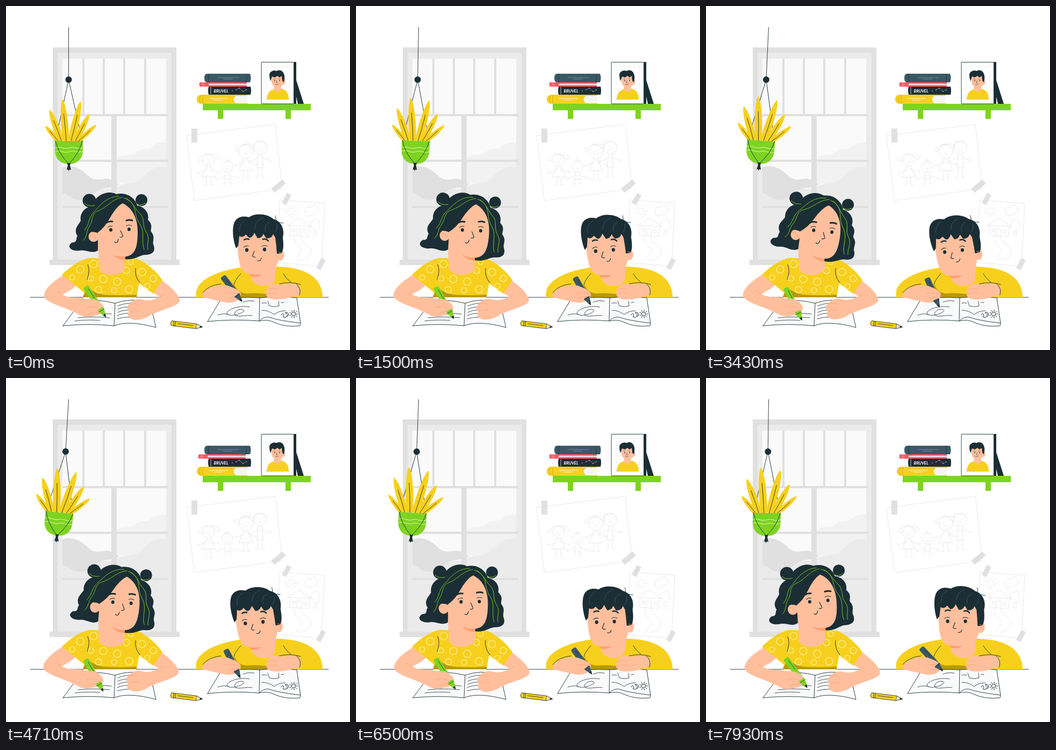
Recreate the animation shown at these times as an HTML page with a canvas. Size 640 px wide and 640 px high, loop 8 s.

```html
<!DOCTYPE html>
<html lang="en">
<head>
<meta charset="utf-8">
<title>Drawing at the table</title>
<style>
html, body { margin: 0; width: 100%; height: 100%; overflow: hidden; background: #fff; }
canvas { display: block; width: 100vw; height: 100vh; }
</style>
</head>
<body>
<canvas id="stage"></canvas>
<script>
const canvas = document.getElementById('stage');
const ratio = window.devicePixelRatio || 1;
canvas.width = canvas.height = 640 * ratio;
const ctx = canvas.getContext('2d');

const LOOP = 8000;
const DARK = '#1b2e35', SLATE = '#3a5964', YELLOW = '#f7d01e', OCHRE = '#b9980f';
const GREEN = '#7ed321', SKIN = '#ffbf9d', SHADE = '#ff9c6e', RED = '#ff5660';
const GREY = '#e0e0e0', MIST = '#ebebeb', PALE = '#fafafa', SKETCH = '#e2e2e2';

// Pose values over the loop, joined by smooth curves
const TIMES = [0, 1500, 2430, 3430, 4710, 6500, 7930, 8000];
const SWING = [0, 1.95, 3.6, 4.9, 6, 3.9, 1.3, 1.2];
const GROWTH = [1, 1.025, 1.04, 1.05, 1.06, 1.08, 1.08, 1.08];
const LEAN = [0, 0.54, 0.78, 1, 0.7, 0.08, -0.38, -0.4];

function sample(values, t) {
  const last = TIMES.length - 1;
  let i = 0;
  while (i < last - 1 && t >= TIMES[i + 1]) i++;
  const slope = k => {
    const a = Math.max(k - 1, 0), b = Math.min(k + 1, last);
    return (values[b] - values[a]) / (TIMES[b] - TIMES[a]);
  };
  const span = TIMES[i + 1] - TIMES[i], u = (t - TIMES[i]) / span;
  const u2 = u * u, u3 = u2 * u;
  return values[i] * (2 * u3 - 3 * u2 + 1) + values[i + 1] * (3 * u2 - 2 * u3) +
    span * (slope(i) * (u3 - 2 * u2 + u) + slope(i + 1) * (u3 - u2));
}

// Rises from 0 to 1 and back, centred on mid
const bump = (t, mid) => Math.abs(t - mid) < 450 ? Math.cos((t - mid) / 900 * Math.PI) : 0;

function fill(color, d) {
  ctx.fillStyle = color;
  ctx.fill(new Path2D(d));
}
function line(color, width, d) {
  ctx.strokeStyle = color;
  ctx.lineWidth = width;
  ctx.stroke(new Path2D(d));
}
function rect(color, x1, y1, x2, y2) {
  ctx.fillStyle = color;
  ctx.fillRect(x1, y1, x2 - x1, y2 - y1);
}
function oval(color, x, y, rx, ry = rx) {
  ctx.fillStyle = color;
  ctx.beginPath();
  ctx.ellipse(x, y, rx, ry, 0, 0, Math.PI * 2);
  ctx.fill();
}
function ring(color, width, x, y, r) {
  ctx.strokeStyle = color;
  ctx.lineWidth = width;
  ctx.beginPath();
  ctx.arc(x, y, r, 0, Math.PI * 2);
  ctx.stroke();
}
function within(draw, x, y, degrees = 0, dx = 0, dy = 0, scale = 1) {
  ctx.save();
  ctx.translate(x + dx, y + dy);
  ctx.rotate(degrees * Math.PI / 180);
  ctx.scale(scale, scale);
  ctx.translate(-x, -y);
  draw();
  ctx.restore();
}
const shift = (draw, dx, dy) => within(draw, 0, 0, 0, dx, dy);

function tape(x, y, w, h, degrees) {
  within(() => rect(GREY, x - w / 2, y - h / 2, x + w / 2, y + h / 2), x, y, degrees);
}
function sun(color, width, x, y, r) {
  ring(color, width, x, y, r);
  for (let i = 0; i < 9; i++) {
    const a = i * Math.PI * 2 / 9, c = Math.cos(a), s = Math.sin(a);
    line(color, width, `M${x + c * r * 1.45},${y + s * r * 1.45}L${x + c * r * 2.1},${y + s * r * 2.1}`);
  }
}

function drawWindow() {
  rect(GREY, 87, 77, 317, 472);
  rect(MIST, 96, 87, 308, 472);
  rect(PALE, 105, 98, 298, 458);
  fill('#f2f2f2', 'M206 284C217 272 229 281 240 273C252 262 259 270 269 263C278 256 286 253 298 254V330H206Z');
  fill(MIST, 'M105 340H200C222 323 238 337 255 318C270 302 284 296 298 301V458H105Z');
  fill(GREY, 'M105 300C121 294 140 302 152 315C162 326 174 323 186 321C198 321 204 331 211 331C198 342 186 334 170 344C154 357 143 363 130 360C119 357 114 349 105 348Z');
  for (const x of [142, 180, 218, 257]) rect(GREY, x, 98, x + 4, 202);
  rect(GREY, 196, 204, 206, 458);
  for (const y of [201, 286, 372]) rect(GREY, 105, y, 302, y + 4);
  rect(GREY, 81, 472, 323, 482);
}

function stickPerson(x, y, r, foot, dress) {
  ring(SKETCH, 0.8, x, y, r);
  oval(SKETCH, x - r / 3, y - 2, 0.8);
  oval(SKETCH, x + r / 3, y - 2, 0.8);
  line(SKETCH, 0.8, `M${x - 4} ${y + 3}Q${x} ${y + 7} ${x + 4} ${y + 3}`);
  const top = y + r, hip = top + (foot - top) * 0.58, w = dress ? 13 : 6;
  line(SKETCH, 0.8, `M${x - 3} ${top}L${x - w} ${hip}H${x + w}L${x + 3} ${top}` +
    `M${x - 4} ${hip}V${foot}h-5M${x + 4} ${hip}V${foot}h5` +
    `M${x - 3} ${top + 6}l-15 7m-3 -3l3 3l-3 2M${x + 3} ${top + 6}l15 5m3 -3l-3 3l4 2`);
}

function drawPapers() {
  const family = 'M336 241L501 220L514 340L351 362Z';
  fill('#fff', family);
  line(SKETCH, 0.8, family);
  stickPerson(377, 287, 11, 333, true);
  line(SKETCH, 0.8, 'M366 286Q360 290 356 286Q364 278 367 277Q380 270 390 284Q396 287 398 281Q390 274 383 276');
  stickPerson(412, 299, 10, 331, false);
  line(SKETCH, 0.8, 'M408 290l3 -5l2 5l4 -3');
  stickPerson(446, 271, 13, 323, true);
  line(SKETCH, 0.8, 'M434 268Q422 274 426 264Q432 265 435 261Q446 252 457 265Q463 269 461 260Q449 253 439 259');
  stickPerson(473, 264, 12, 319, false);
  line(SKETCH, 0.8, 'M462 261Q460 250 469 253Q479 248 485 259');
  tape(350.5, 241, 11, 26, 0);
  tape(507, 335, 27, 10, -40);

  const house = 'M510 361L593 367L587 484L503 477Z';
  fill('#fff', house);
  line(SKETCH, 0.8, house);
  sun(SKETCH, 0.8, 530, 382, 6);
  line(SKETCH, 0.8, 'M524 408L545 394L568 410ZM529 408L527 427L563 429L565 410M540 428V415H549V428M533 415h4v5h-4ZM554 417h5v5h-5Z');
  line(SKETCH, 0.8, 'M557 384C553 376 563 372 566 376C567 368 579 368 579 375C585 380 578 388 572 386C568 393 555 392 557 384M571 413C562 405 567 398 573 399C579 391 586 400 581 405C588 411 580 420 573 417V429M577 417V429');
  line(SKETCH, 0.8, 'M537 430C533 451 560 447 546 462L540 472M548 430C551 445 575 447 566 463Q558 474 545 473');
  tape(522, 359, 21, 9, -62);
  tape(586, 480, 21, 9, -62);
}

function drawShelf(t) {
  rect(GREEN, 366, 182, 567, 194);
  rect(GREEN, 394, 194, 404, 210);
  rect(GREEN, 520, 194, 530, 210);

  fill(SLATE, 'M374 126H454Q457 134 454 142H374Q369 142 369 134Q369 126 374 126Z');
  line(DARK, 0.7, 'M378 126Q375 134 378 142M446 127Q449 134 446 142');
  line('#8fa1a8', 0.7, 'M394 133H433M404 136H421');

  shift(() => {
    fill(RED, 'M361 142H448V150H361Q358 146 361 142Z');
    rect('#ffd9da', 377, 144.5, 448, 147.5);
    line('#ffd9da', 0.6, 'M365 143V149M368 143V149');
  }, -2 * bump(t, 4710), 0);

  fill('#f5f5f5', 'M369 151H382V164H369Q372 157 369 151Z');
  fill(DARK, 'M377 150H455Q457 157 455 165H377Q375 157 377 150Z');
  line('#fff', 0.7, 'M381 151V164');
  ctx.fillStyle = '#fff';
  ctx.font = 'italic bold 7.6px Lato, sans-serif';
  ctx.fillText('BRUVEL', 386.5, 160.8);
  line('#fff', 0.4, 'M428 156L434 153L441 159L447 156');
  for (const [x, y] of [[421, 158], [428, 156], [434, 153], [441, 159], [447, 156]]) oval('#fff', x, y, 0.7);

  shift(() => {
    fill(YELLOW, 'M362 165H449V182H362Q355 181 355 173.5Q355 166 362 165Z');
    fill('#f5f5f5', 'M428 167H449V181H428Q419 174 428 167Z');
    line(OCHRE, 0.6, 'M362 167Q358 174 362 181M367 166Q364 174 367 181');
    line('#fff', 0.8, 'M378 172H412M387 175H402');
  }, -3 * bump(t, 3430), 0);

  fill(DARK, 'M540 138L554 182H543L538 160Z');
  rect(DARK, 535, 104, 540, 182);
  rect('#fff', 475, 104, 535.5, 182);
  line(DARK, 0.9, 'M475.5 104.5H535.5V182H475.5Z');
  line(SKETCH, 0.6, 'M475 104L484 113H528V174H484V113M536 104L528 113M475 182L484 174M536 182L528 174');
  fill(YELLOW, 'M485 174C486 162 490 157 498 155L513 154C522 156 526 163 526 174Z');
  fill(SKIN, 'M499 146H512V155Q506 164 498 155Z');
  fill(SKIN, 'M494 130H517V145Q512 152 502 151Q494 148 494 141Z');
  oval(SKIN, 517, 142, 2.5, 4);
  fill(DARK, 'M492 140Q488 127 492 123Q498 118 503 121Q511 117 516 124Q520 131 517 142L514 139L513 130L509 133L505 130L500 133L495 131Z');
  oval(DARK, 500, 139, 0.9);
  oval(DARK, 509, 139, 0.9);
  line(DARK, 0.6, 'M498 136h3M507 136h3M504 139l-1 4h2M501 146q3 2 6 -1');
}

function leaf(baseX, tipX, tipY, width) {
  const vx = tipX - baseX, vy = tipY - 251, len = Math.hypot(vx, vy);
  const nx = -vy / len * width, ny = vx / len * width;
  const at = (k, side) => `${baseX + vx * k + nx * side} ${251 + vy * k + ny * side}`;
  fill(YELLOW, `M${at(0, -0.7)}C${at(0.4, -1.1)} ${at(0.9, -0.75)} ${at(1, 0)}` +
    `C${at(0.9, 0.75)} ${at(0.4, 1.1)} ${at(0, 0.7)}Z`);
  line(DARK, 0.8, `M${at(0, 0)}Q${at(0.35, 0.12)} ${at(0.65, 0)}`);
}

function drawPlant(swing, growth) {
  const upper = swing * 0.55 * Math.PI / 180;
  const kx = 116.5 - 97 * Math.sin(upper), ky = 40 + 97 * Math.cos(upper);
  line(DARK, 0.9, `M116.5 40L${kx} ${ky}`);
  within(() => {
    line(DARK, 0.9, 'M92 251L116.5 137L142 251');
    within(() => {
      leaf(97, 73, 223, 5);
      leaf(135, 168, 221, 5);
      leaf(103, 81, 193, 7);
      leaf(129, 155, 201, 6.5);
      leaf(121, 139, 177, 7.5);
      leaf(112, 105, 173, 7.5);
    }, 117, 251, 0, 0, 0, growth);
    fill(GREEN, 'M91 251H143V268C143 284 133 294 117 294C101 294 91 284 91 268Z');
    line('#d9f5b0', 1, 'M91 264Q97 262 104 264T117 264T130 264T143 263M92 271Q98 269 105 271T118 271T131 271T143 270');
    line(DARK, 0.9, 'M92 251Q96 272 117 294Q137 273 142 251');
    fill(DARK, 'M114 292H120L119 297L121 305L118 304L117 307L115 304L113 305L115 297Z');
  }, 116.5, 137, swing, kx - 116.5, ky - 137);
  oval(DARK, kx, ky, 6);
}

function drawGirlHead() {
  fill(SHADE, 'M197 462Q211 469 222 465V472Q207 472 197 462Z');
  oval(DARK, 155, 362, 12.5);
  oval(DARK, 252, 361, 11);
  fill(DARK, 'M160 372C166 351 190 342 205 350C225 345 241 358 244 371C259 374 267 386 264 398C275 408 268 415 270 420C279 431 271 437 275 446C279 460 268 463 258 463C247 464 240 473 222 471L222 440H172V454C161 463 148 452 137 455C120 457 112 447 123 440C134 440 129 432 133 428C124 414 137 406 139 399C137 384 148 374 160 372Z');
  fill(SKIN, 'M170 418C178 395 193 378 217 367C236 376 245 396 245 420C245 447 241 463 224 466C207 468 186 458 171 455V440Z');
  oval(SKIN, 163, 429, 9.5, 10);
  fill(DARK, 'M217 366C196 373 185 391 170 408L153 421Q163 419 170 422Q184 412 193 395Q203 376 217 366Z');
  line(SHADE, 0.9, 'M157 426Q164 424 167 432');
  line(GREEN, 0.9, 'M216 356C198 359 191 372 174 380C157 386 163 398 155 410C149 419 152 428 144 436M210 354C188 355 177 368 165 382C151 396 157 405 146 417');
  line(GREEN, 0.9, 'M219 357C237 363 239 377 249 386C260 397 252 408 261 421C269 434 261 442 264 453M224 358C247 372 235 388 250 407C259 422 251 440 257 453');
  line(GREEN, 0.9, 'M146 367Q153 374 165 371M244 369Q252 372 259 367');
  oval(DARK, 195, 416.5, 3, 3.2);
  oval(DARK, 229, 415.5, 3, 3.2);
  line(DARK, 1, 'M189 412Q193 408 198 410M224 409Q229 406 234 409');
  line(DARK, 3, 'M187 403Q191 400 198 401M224 399Q230 397 235 399');
  line(DARK, 1.2, 'M213 418L217.5 428Q216 431 212 430M202 439Q207 443 209 434');
  for (const [x, y] of [[184, 430], [188, 427], [190, 432], [231, 428], [235, 431], [237, 427]]) oval(SHADE, x, y, 0.6);
}

// Pens run along a straight axis; the tip part is repeated over the hand
function drawPen(x1, y1, x2, y2, color, tipOnly) {
  const len = Math.hypot(x2 - x1, y2 - y1);
  ctx.save();
  ctx.translate(x1, y1);
  ctx.rotate(Math.atan2(y2 - y1, x2 - x1));
  if (tipOnly) {
    ctx.beginPath();
    ctx.rect(len * 0.72, -9, len, 18);
    ctx.clip();
  }
  fill(color, `M4 -5.5Q0 -5.5 0 -2.5V2.5Q0 5.5 4 5.5H${len - 15}L${len - 6} 2.5V-2.5L${len - 15} -5.5Z`);
  fill(DARK, `M${len - 6} -2.5L${len} 0L${len - 6} 2.5Z`);
  line(DARK, 0.7, `M7 -2H${len * 0.4}M${len - 15} -5.5V5.5`);
  ctx.restore();
}

function drawGirlBook() {
  fill(PALE, 'M106 595L140 549Q172 545 203 553Q229 543 268 550L279 598Q227 584 201 595Q155 590 106 595Z');
  line(DARK, 0.9, 'M106 595L140 549Q172 545 203 553Q229 543 268 550L279 598Q227 584 201 595Q155 590 106 595ZM203 553L201 595');
  line(DARK, 0.8, 'M139 574Q160 570 196 573M134 580Q164 577 193 580M128 586Q153 583 175 585M208 558Q221 552 239 553M208 564Q220 559 230 560M208 570Q219 565 227 566M207 576Q218 571 228 572M207 582Q220 578 231 579');
}

function drawGirl(lean) {
  fill(YELLOW, 'M153 469Q164 468 176 470L222 470Q235 468 245 471L248 514L243 542H143L145 533L129 520L147 500Z');
  fill(OCHRE, 'M143 542Q145 534 154 526Q166 534 181 537Q213 539 243 537V542Z');
  const dots = [[163, 480, 7], [181, 508, 7], [207, 513, 7], [224, 492, 6], [229, 527, 7], [201, 529, 5], [172, 528, 6], [232, 476, 5], [158, 507, 5]];
  for (const [x, y, r] of dots) ring('#fff3b0', 1.1, x, y, r);
  line(DARK, 0.9, 'M45 542H143M243 542H600');
  drawGirlBook();

  const turn = (7 * lean) * Math.PI / 180, c = Math.cos(turn), s = Math.sin(turn);
  const px = 148, py = 522 + 2 * lean;
  const pen = [px, py, px + 38 * c - 57 * s, py + 57 * c + 38 * s, GREEN];
  drawPen(...pen);
  shift(() => {
    fill(SKIN, 'M108 500C86 513 70 528 71 540C73 552 112 561 132 572C142 579 154 580 165 576C178 575 185 566 181 558C175 548 163 544 149 545C136 540 122 546 105 537C116 531 124 527 132 518Z');
    line(SHADE, 0.8, 'M150 562Q160 556 172 563M154 573Q163 569 174 569M105 537Q100 535 96 531');
  }, -2 * lean, -lean);
  drawPen(...pen, true);
  shift(() => {
    fill(SKIN, 'M287 508C305 521 323 537 323 548C322 558 296 563 270 574C260 582 244 586 236 583C227 580 225 574 229 569C223 564 225 557 230 555C235 546 247 543 257 547C267 549 278 546 286 541L269 531Z');
    line(SHADE, 0.8, 'M229 569Q238 564 248 567M230 555Q239 552 247 556M286 541Q291 540 294 536');
  }, -2.5 * lean, -lean);

  fill(YELLOW, 'M153 469C134 474 117 487 104 500L129 520L149 502Z');
  fill(YELLOW, 'M243 470C263 478 280 494 291 510L274 535Q258 525 246 514Z');
  for (const [x, y, r] of [[138, 490, 7], [123, 505, 5], [253, 495, 7], [274, 507, 6], [263, 521, 5]]) ring('#fff3b0', 1.1, x, y, r);
  line(DARK, 0.9, 'M152 481Q157 492 151 509M241 488Q239 503 249 515');
  fill(SKIN, 'M171 445L173 490C184 505 211 503 221 490V455Z');
  within(drawGirlHead, 192, 458, 7.5 * lean);
}

function drawBoyHead() {
  oval(SKIN, 510, 463, 7.5, 11);
  fill(SHADE, 'M451 497Q465 501 478 498Q468 506 456 503Z');
  fill(SKIN, 'M431 425C430 459 433 490 445 496C456 501 478 501 490 496C504 490 508 476 508 456L505 420Z');
  fill(DARK, 'M428 451C422 434 420 414 425 402C432 390 443 391 452 393C465 384 487 387 497 396C512 400 519 415 515 431C517 446 516 456 512 460L504 461Q503 446 501 431L497 424C496 430 490 433 484 432L479 424Q476 432 468 432L462 422Q458 432 452 431L446 425Q441 432 434 428Q433 441 432 446Z');
  line(DARK, 0.9, 'M499 405Q504 399 501 390M504 403Q510 402 516 404');
  line('#48616a', 0.7, 'M435 420Q432 404 446 397M463 414Q463 399 478 394M483 419Q480 406 491 402M500 422Q506 416 504 406');
  line(SHADE, 0.9, 'M508 458Q514 458 513 466');
  oval(DARK, 448, 454, 3.1, 3.4);
  oval(DARK, 481, 453, 3.1, 3.4);
  line(DARK, 1, 'M442 449Q446 445 451 447M476 447Q481 444 486 447');
  line(DARK, 2.5, 'M443 435Q447 432 452 434M478 434Q484 432 488 437');
  line(DARK, 1.2, 'M462 456L458.5 465Q460 468 464 467M468 474Q474 475 475 469');
}

function drawBoyBook() {
  const pages = 'M375 587L399 547Q436 540 472 543Q509 539 541 543L548 590Q505 585 490 579Q480 577 471 586Q423 582 375 587Z';
  fill(PALE, pages);
  line(DARK, 0.9, pages + 'M472 543L471 586Q487 582 500 589Q520 598 547 595L548 590');
  line(DARK, 0.8, 'M453 560C435 556 411 564 411 572C417 580 440 572 443 567C440 560 422 567 426 575C433 580 446 574 458 576M394 575Q405 571 414 574M441 551Q449 547 462 549');
  line(DARK, 0.8, 'M476 553Q480 551 485 553M487 549L490 558Q500 561 508 558L507 549M476 566Q488 566 499 574Q507 567 520 567M512 552L517 551');
  line(DARK, 1, 'M512 575C515 568 519 576 515 578C524 583 526 570 519 571C524 567 529 575 523 578');
  sun(DARK, 1, 535, 573, 3.6);
}

function drawBoy(lean) {
  fill(YELLOW, 'M354 542C352 529 356 522 363 515C377 501 402 492 438 486L500 485C532 485 557 491 573 505C586 517 589 531 589 542Z');
  fill(OCHRE, 'M424 517Q431 533 446 535Q466 533 486 536V542H419Z');
  line(DARK, 0.9, 'M437 498Q427 508 424 518M366 533Q378 519 400 517M508 517Q529 512 548 518M530 514Q521 507 516 498');
  fill(SKIN, 'M455 485L457 509C464 525 494 524 500 510L503 478Z');
  drawBoyBook();

  const turn = (52.5 + 14.5 * lean) * Math.PI / 180;
  const px = 403 + 8 * lean, py = 503 + 3 * lean;
  const pen = [px, py, px + 60 * Math.cos(turn), py + 60 * Math.sin(turn), SLATE];
  drawPen(...pen);
  shift(() => {
    fill(SKIN, 'M366 535C376 521 395 518 412 520C425 525 439 530 437 538C437 547 425 553 411 552C395 549 381 545 366 542Z');
    line(SHADE, 0.8, 'M411 535Q422 531 434 536M415 544Q425 540 434 542');
  }, -0.5 * lean, 0);
  drawPen(...pen, true);
  within(drawBoyHead, 492, 502, -4.8 * lean);
  shift(() => {
    fill(SKIN, 'M486 526C489 517 500 514 512 519C526 514 547 516 548 526C549 537 543 541 533 541C519 546 503 547 493 545C483 543 482 534 486 526Z');
    line(SHADE, 0.8, 'M487 528Q495 523 505 527M486 536Q495 532 504 535');
    line(DARK, 0.9, 'M540 517Q550 525 546 538');
  }, 0.8 * lean, 0);
}

function drawLoosePencil() {
  within(() => {
    fill(YELLOW, 'M308 589H354L366 593.5L354 598H308Q304 593.5 308 589Z');
    fill('#ffe9b5', 'M353 589L363 592.5V594.5L353 598Z');
    fill(DARK, 'M361 591.5L366 593.5L361 595.5Z');
    line(DARK, 0.8, 'M308 589H354L366 593.5L354 598H308Q304 593.5 308 589ZM312 589V598M315 589V598M319 593H348M354 589V598');
  }, 335, 593.5, 7);
}

function frame(now) {
  const t = Math.max(0, now) % LOOP;
  const lean = sample(LEAN, t);
  ctx.setTransform(ratio, 0, 0, ratio, 0, 0);
  ctx.lineCap = ctx.lineJoin = 'round';
  rect('#fff', 0, 0, 640, 640);
  drawWindow();
  drawPapers();
  drawShelf(t);
  drawPlant(sample(SWING, t), sample(GROWTH, t));
  drawGirl(lean);
  drawBoy(lean);
  drawLoosePencil();
  requestAnimationFrame(frame);
}
frame(0);
</script>
</body>
</html>
```
